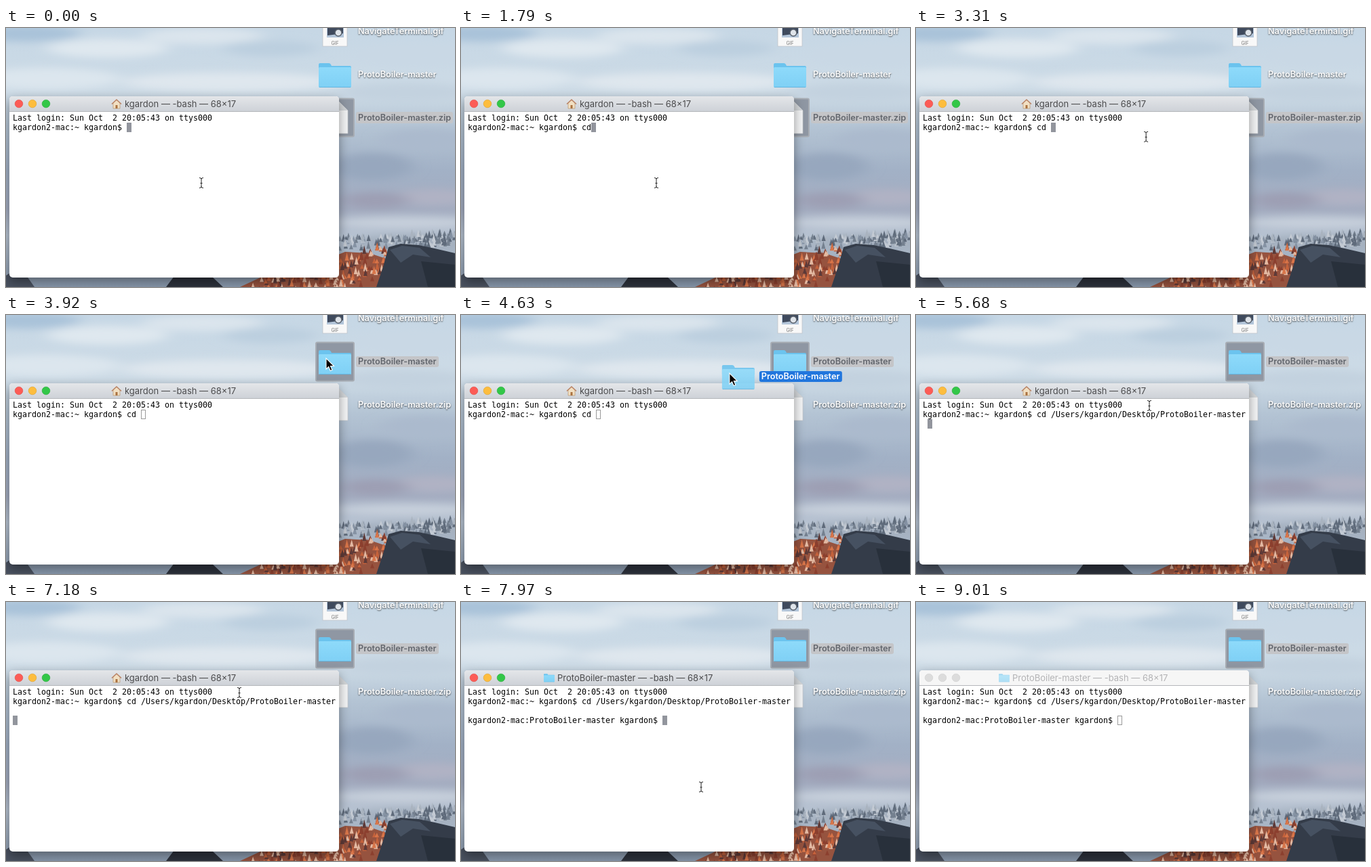
An HTML page for the animation above (9110 ms loop, 662 by 383 pixels).

```html
<!DOCTYPE html>
<html lang="en">
<head>
<meta charset="utf-8">
<title>Drag a folder into the terminal</title>
<style>
html, body { margin: 0; width: 100%; height: 100%; overflow: hidden; background: #b9c9d8; }
svg { display: block; }
text { white-space: pre; }
.term text { font: 11.63px "DejaVu Sans Mono", monospace; -webkit-text-stroke: .15px #000; }
.label { font: 600 12.65px Inter, sans-serif; fill: #fff; text-shadow: 0 1px 2px rgba(0,0,0,.7); }
.picked .label { fill: #62666d; text-shadow: none; }
.pick { display: none; }
.picked .pick { display: inline; }
#title { font: 13px Inter, sans-serif; fill: #4b4b4d; }
.window { filter: drop-shadow(0 6px 8px rgba(0,0,0,.4)); }
.idle #title { fill: #b3b3b5; }
.idle .bar { fill: #f6f6f6; }
.idle .button { fill: #dcdcdc; stroke: #cfcfcf; }
.idle .icon { opacity: .6; }
</style>
</head>
<body>
<svg width="662" height="383" viewBox="0 0 662 383">
  <defs>
    <linearGradient id="sky" x2="0" y2="1">
      <stop offset="0" stop-color="#c6d7e5"/>
      <stop offset=".25" stop-color="#cddbe6"/>
      <stop offset=".38" stop-color="#b4c4d4"/>
      <stop offset=".55" stop-color="#a2b1c6"/>
      <stop offset=".7" stop-color="#a3acc0"/>
      <stop offset=".8" stop-color="#b7c3d2"/>
      <stop offset="1" stop-color="#8797ab"/>
    </linearGradient>
    <linearGradient id="bar" x2="0" y2="1">
      <stop offset="0" stop-color="#e4e6e9"/>
      <stop offset="1" stop-color="#cdd1d7"/>
    </linearGradient>
    <linearGradient id="blue" x2="0" y2="1">
      <stop offset="0" stop-color="#8edafa"/>
      <stop offset="1" stop-color="#7fd0f5"/>
    </linearGradient>
    <filter id="soft" x="-50%" y="-100%" width="200%" height="300%"><feGaussianBlur stdDeviation="12 6"/></filter>
    <g id="folder">
      <path d="M0 3q0-2 2-2h13q2 0 3 2l1 2h27q2 0 2 2v8H0z" fill="#6bc3ee"/>
      <rect y="7" width="48" height="30" rx="1.5" fill="url(#blue)"/>
      <path d="M1 36.5h46" stroke="#62b5df"/>
    </g>
    <g id="page">
      <path d="M0 0h24l13 13v34H0z" fill="#f4f5f6" stroke="#c2c5c9" stroke-width=".7"/>
      <path d="M24 0v13h13z" fill="#d4d7da"/>
    </g>
    <path id="ibeam" d="M-3-7.5q3 0 3 2v11q0 2-3 2M3-7.5q-3 0-3 2M0 5.5q0 2 3 2M-1.5 .5h3"/>
  </defs>

  <rect width="662" height="383" fill="url(#sky)"/>
  <g id="clouds" filter="url(#soft)"></g>
  <g id="firs"></g>
  <path d="M0 383v-17l14-9 16 9 12 17z" fill="#4a5260"/>
  <path d="M236 383l12-16 26 2 30-1 16 15z" fill="#2d323c"/>
  <path d="M345 383l30-14 100-28 25-10 36 2 30 10v40z" fill="#96533f"/>
  <g id="trees"></g>
  <path d="M546 383l10-30 8-29 18-5 26 2 24 5 30 7v50z" fill="#343c49"/>
  <path d="M566 328l18-6 26 3 16 14-26-4-18 12z" fill="#465161"/>
  <path d="M612 345l50 5v33h-40z" fill="#28303b"/>

  <g>
    <rect x="467" y="-20" width="36" height="47" fill="#f8f8f8" stroke="#bdc1c6" stroke-width=".7"/>
    <rect x="473" y="-10" width="25" height="24" fill="#b4c6da"/>
    <path d="M474 0h23v8l-23 3z" fill="#3f4a5d"/>
    <circle cx="490" cy="7" r="5" fill="#dfe4ea" stroke="#59616c" stroke-width="1.5"/>
    <text x="485" y="24.5" text-anchor="middle" font-size="7" font-family="Inter, sans-serif" fill="#777">GIF</text>
    <text class="label" x="519" y="9">NavigateTerminal.gif</text>
  </g>
  <g id="dir">
    <g class="pick">
      <rect x="457" y="40.5" width="56" height="57" rx="2" fill="#8f97a3" stroke="#a8adb4" stroke-width="2"/>
      <rect x="516" y="61" width="122" height="16" rx="3" fill="#c4c5c8"/>
    </g>
    <use href="#folder" x="461" y="51"/>
    <text class="label" x="519" y="73">ProtoBoiler-master</text>
  </g>
  <g id="zip">
    <g class="pick">
      <rect x="457" y="104.5" width="56" height="56" rx="2" fill="#8f97a3" stroke="#a8adb4" stroke-width="2"/>
      <rect x="516" y="124" width="143" height="17" rx="3" fill="#c4c5c8"/>
    </g>
    <use href="#page" x="467" y="109"/>
    <text class="label" x="519" y="137">ProtoBoiler-master.zip</text>
  </g>

  <g id="win">
    <g class="window">
      <rect x="5" y="101" width="486" height="268" rx="5" fill="#fff"/>
      <path class="bar" d="M5 124v-18q0-5 5-5h476q5 0 5 5v18z" fill="url(#bar)"/>
    </g>
    <path d="M5 123.5h486" stroke="#b4b6ba"/>
    <circle class="button" cx="19" cy="112" r="5.8" fill="#fc5c56" stroke="#e2463f" stroke-width=".6"/>
    <circle class="button" cx="39" cy="112" r="5.8" fill="#fdbd3e" stroke="#dfa023" stroke-width=".6"/>
    <circle class="button" cx="59" cy="112" r="5.8" fill="#33c748" stroke="#1fab33" stroke-width=".6"/>
    <g id="home">
      <path d="M158 111l5-5 5 5v8h-10z" fill="#f1dfc2" stroke="#b48a5f" stroke-width=".6"/>
      <path d="M156 112.5l7-6.5 7 6.5" fill="none" stroke="#b98263" stroke-width="1.6"/>
      <path d="M161.500 119v-5h3v5z" fill="#a9713f"/>
    </g>
    <use id="mini" class="icon" href="#folder" transform="translate(122 106) scale(.333)"/>
    <text id="title" y="117"></text>
    <path id="glow" d="M5 124.500h486" stroke="#8ec5f3" stroke-width="2"/>
    <g class="term">
      <text x="10" y="137">Last login: Sun Oct  2 20:05:43 on ttys000</text>
      <text id="line" x="10" y="151"></text>
      <text id="next" x="10" y="179"></text>
    </g>
    <rect id="caret" width="6" height="13"/>
  </g>

  <g id="ghost">
    <use href="#folder" x="461" y="51" opacity=".88"/>
    <rect x="516" y="61" width="122" height="16" rx="3" fill="#2176dd"/>
    <text class="label" x="519" y="73" style="text-shadow:none">ProtoBoiler-master</text>
  </g>
  <g id="beam" fill="none">
    <use href="#ibeam" stroke="#fff" stroke-width="2.600"/>
    <use href="#ibeam" stroke="#222"/>
  </g>
  <path id="arrow" d="M0 0v16l3.700-3.500 2.500 6 2.800-1.200-2.500-5.800h5z" stroke="#fff" stroke-width="1.100"/>
</svg>
<script>
const LOOP = 9110, COL = 7, ROW = 14;
const USER = 'kgardon', HOST = USER + '2-mac', DIR = 'ProtoBoiler-master';
const $ = id => document.getElementById(id);
const show = (id, on) => $(id).style.display = on ? '' : 'none';
const move = (id, x, y) => $(id).setAttribute('transform', `translate(${x} ${y})`);
const setAll = (el, attrs) => { for (const k in attrs) el.setAttribute(k, attrs[k]); };

function add(parent, tag, attrs) {
  const el = document.createElementNS('http://www.w3.org/2000/svg', tag);
  setAll(el, attrs);
  $(parent).append(el);
}

let seed = 7;
const rnd = () => (seed = seed * 16807 % 2147483647) / 2147483647;
const pick = list => list[Math.floor(rnd() * list.length)];

// Soft cloud bands: x, y, rx, ry, colour
[[30, 8, 80, 12, '#a9c2d9'], [150, 30, 90, 14, '#dfe8ef'], [290, 12, 90, 12, '#dbe5ed'],
 [390, 30, 70, 12, '#bccfdf'], [60, 75, 110, 16, '#dce6ee'], [330, 80, 160, 14, '#dfe7ee'],
 [600, 40, 90, 18, '#c9d8e5'], [590, 95, 100, 14, '#c3d2df'], [620, 165, 70, 16, '#abbacd'],
 [540, 205, 60, 20, '#97a7be'], [630, 250, 60, 12, '#b0b2c4'], [545, 255, 50, 12, '#9d9fb4'],
 [590, 288, 110, 9, '#c7d0dc'], [600, 318, 90, 14, '#a4b0bf']]
  .forEach(([cx, cy, rx, ry, fill]) => add('clouds', 'ellipse', { cx, cy, rx, ry, fill }));

function plant(parent, count, x0, width, top, colors) {
  for (let i = 0; i < count; i++) {
    const x = x0 + rnd() * width, y = top(x), h = 5 + rnd() * 8;
    add(parent, 'path', { d: `M${x} ${y - h}l3 ${h}h-6z`, fill: pick(colors) });
  }
}
plant('firs', 150, 492, 170, x => 306 + (662 - x) * .04 + rnd() * 18,
  ['#8592a3', '#74808f', '#a9b3bf', '#5f6b7b', '#c3cad3']);
plant('trees', 220, 360, 202, x => 375 - (x - 360) * .25 + rnd() * 50,
  ['#c4623c', '#d9764a', '#8b3f2e', '#5d3a38', '#e3b9a2']);

// Pointer keys: time, x, y
const keys = [[0, 288, 229], [2930, 288, 229], [3310, 339, 161], [3810, 472, 64], [4390, 472, 64],
  [4630, 396, 86], [5120, 347, 125], [5600, 344, 134], [7810, 344, 134], [7970, 354, 273],
  [8350, 358, 402], [LOOP, 358, 402]];

const slope = (i, k) => (keys[i + 1][k] - keys[i][k]) / (keys[i + 1][0] - keys[i][0]);

function tangent(i, k) {
  if (!i || i === keys.length - 1) return 0;
  const a = slope(i - 1, k), b = slope(i, k);
  return a * b > 0 ? 2 * a * b / (a + b) : 0;
}

// Monotone cubic through the keys
function pointer(t, k) {
  let i = 0;
  while (i < keys.length - 2 && t >= keys[i + 1][0]) i++;
  const [p, q] = [keys[i], keys[i + 1]], d = q[0] - p[0], u = (t - p[0]) / d, v = 1 - u;
  return v * v * (1 + 2 * u) * p[k] + u * u * (3 - 2 * u) * q[k]
    + d * u * v * (v * tangent(i, k) - u * tangent(i + 1, k));
}

const PRESS = 3870, DRAG = 4390, DROP = 5440, ENTER = 7180, PROMPT = 7240, BLUR = 9010;

function draw(t) {
  const x = pointer(t, 1), y = pointer(t, 2);
  const dragging = t >= DRAG && t < DROP, done = t >= PROMPT;

  $('zip').classList.toggle('picked', t < PRESS);
  $('dir').classList.toggle('picked', t >= PRESS);
  $('win').classList.toggle('idle', t >= BLUR);

  const typed = [1370, 1790, 2360].filter(s => t >= s).length;
  const start = HOST + ':~ ' + USER + '$ ';
  const path = t >= DROP ? `/Users/${USER}/Desktop/${DIR}` : '';
  const prompt = `${HOST}:${DIR} ${USER}$ `;
  $('line').textContent = start + 'cd '.slice(0, typed) + path;
  $('next').textContent = done ? prompt : '';

  let col = start.length + typed, row = 0;
  if (done) [col, row] = [prompt.length, 2];
  else if (t >= ENTER) [col, row] = [0, 2];
  else if (path) [col, row] = [1, 1];
  const hollow = t >= PRESS && t < DROP || t >= BLUR;
  setAll($('caret'), {
    x: 10.5 + col * COL, y: 140.5 + row * ROW,
    fill: hollow ? 'none' : '#92959d', stroke: hollow ? '#9a9a9a' : '#92959d'
  });

  $('title').textContent = (done ? DIR : USER) + ' — -bash — 68×17';
  $('title').setAttribute('x', done ? 142 : 175);
  show('home', !done);
  show('mini', done);
  show('glow', dragging && y > 112);

  const fade = t < DRAG ? 0 : Math.min(1, Math.max(0, 1 - (t - DROP) / 120));
  $('ghost').setAttribute('opacity', fade);
  move('ghost', x - 472, y - 64);

  const inText = !dragging && x > 5 && x < 491 && y > 124 && y < 369;
  show('beam', inText);
  show('arrow', !inText);
  move('beam', x, y);
  move('arrow', x, y);
}

function tick() {
  draw(performance.now() % LOOP);
  requestAnimationFrame(tick);
}
tick();
</script>
</body>
</html>
```
